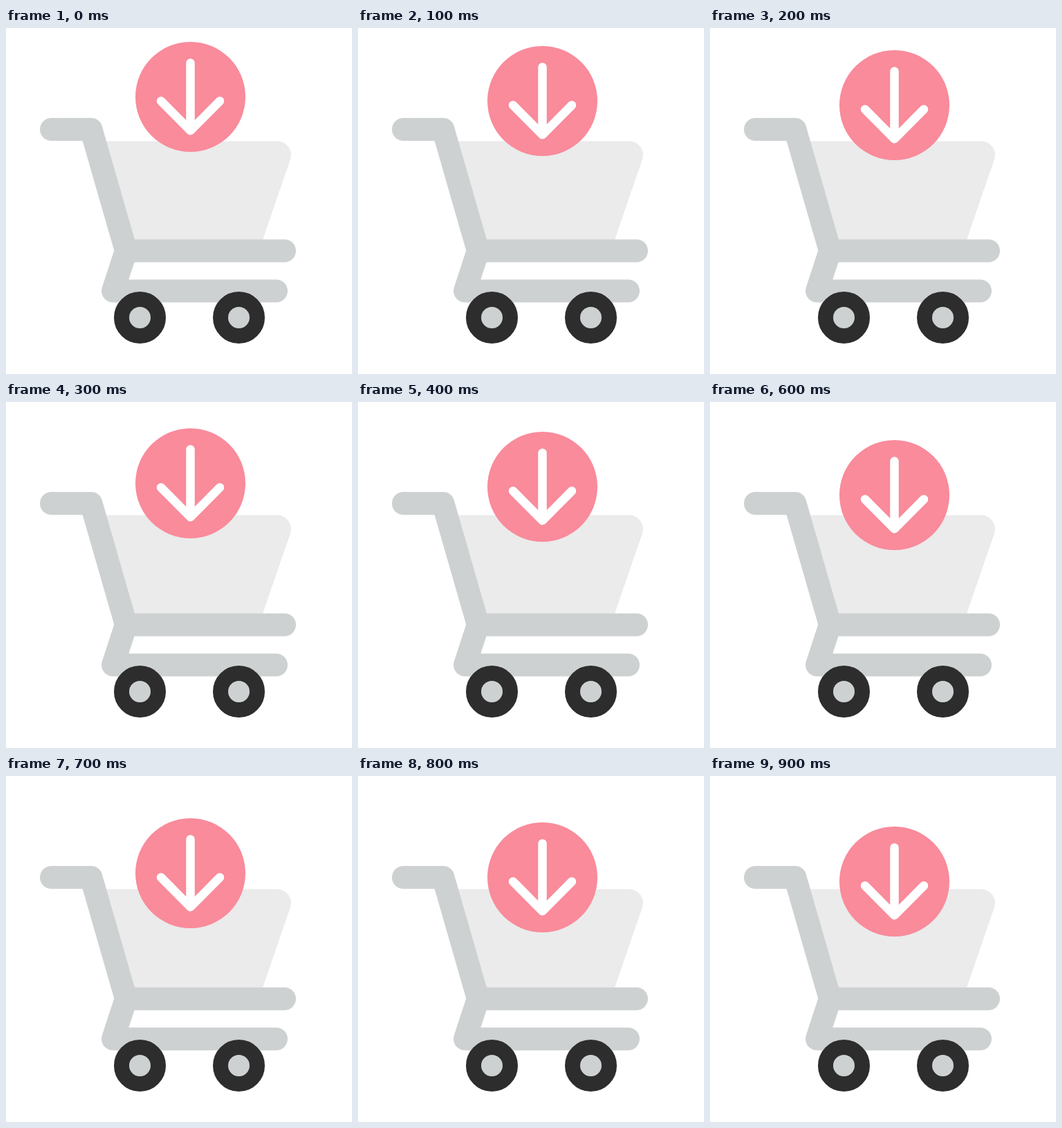
These frames come from a looping animation (500 px wide and 500 px high, 1 s). An HTML page:

```html
<!DOCTYPE html>
<html lang="en">
<head>
<meta charset="utf-8">
<title>Add to cart</title>
<style>
  html, body { margin: 0; width: 100%; height: 100%; overflow: hidden; background: #fff; }
  svg { display: block; width: 100%; height: 100%; }
  .line { fill: none; stroke-linecap: round; stroke-linejoin: round; }
  .frame { stroke: #cdd1d2; stroke-width: 33; }
  .arrow { stroke: #fff; stroke-width: 12.5; }
  .wheel { fill: #cdd1d2; stroke: #2d2d2d; stroke-width: 22; }
</style>
</head>
<body>
<svg viewBox="0 0 500 500">
  <path fill="#ebebeb" d="M135 163.5H392A20 20 0 0 1 410.9 190L369.5 310H170Z"/>
  <path class="line frame" d="M65.5 146.5H123L173.5 322H402.5M173.5 322L154.5 380H390.5"/>
  <circle class="wheel" cx="193.5" cy="418.5" r="26.5"/>
  <circle class="wheel" cx="336.5" cy="418.5" r="26.5"/>
  <g id="badge">
    <circle cx="266.5" cy="99.5" r="79.5" fill="#f98b9b"/>
    <path class="line arrow" d="M266.5 50.5V148.3M224 105.5L266.5 148.3L309 105.5"/>
  </g>
</svg>
<script>
  const badge = document.getElementById('badge');
  const LOOP = 1000, STEP = 100, DROP = 5.85;

  // The badge sinks in ten discrete steps, then jumps back to the top.
  function draw(now) {
    const step = Math.floor((now % LOOP) / STEP);
    badge.setAttribute('transform', `translate(0 ${Math.round(step * DROP)})`);
  }

  const start = performance.now();
  function tick() {
    draw(performance.now() - start);
    requestAnimationFrame(tick);
  }
  tick();
</script>
</body>
</html>
```
